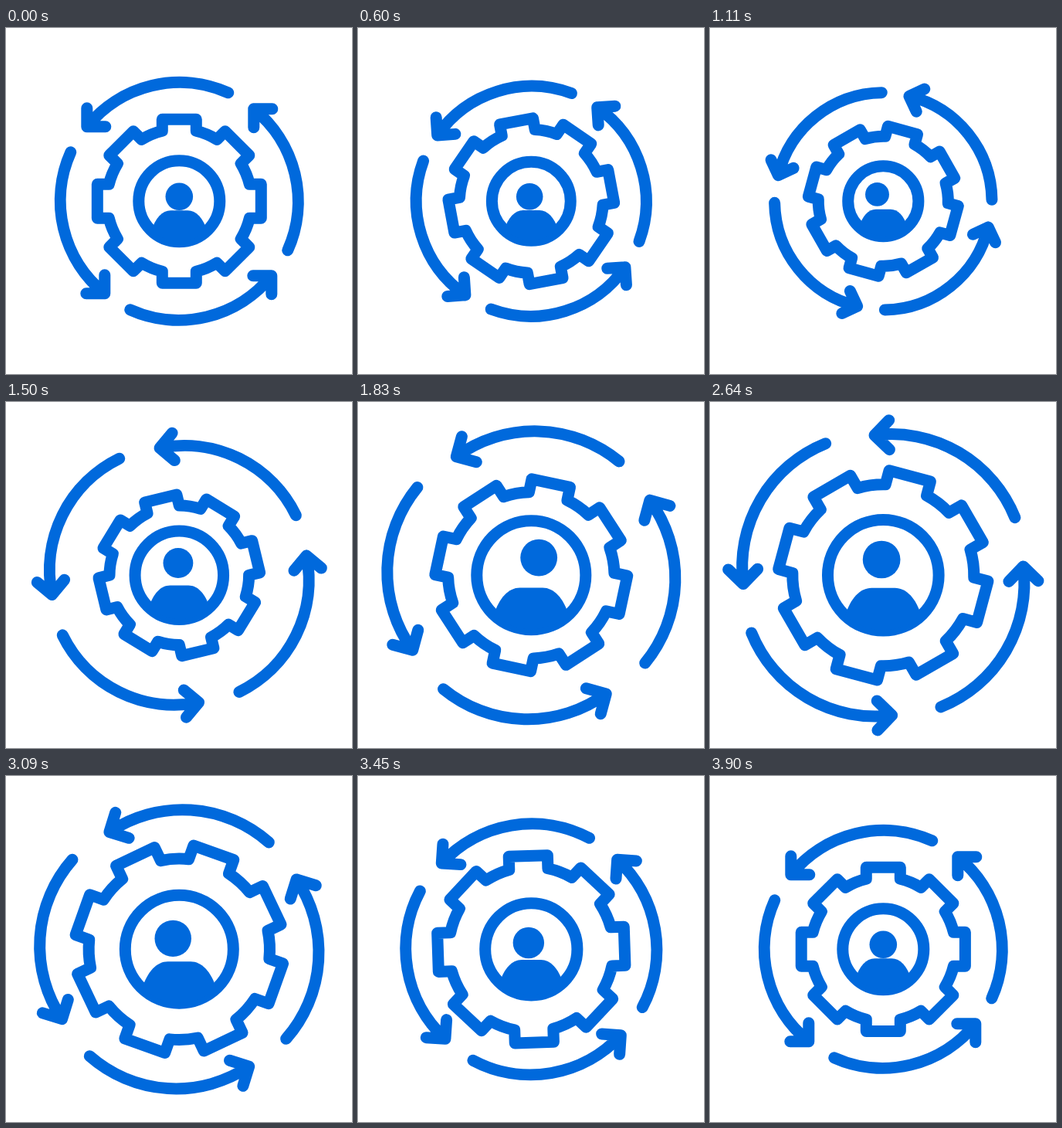
An HTML page for the animation above (4500 ms loop, 448 by 448 pixels).

```html
<!DOCTYPE html>
<html lang="en">
<head>
<meta charset="utf-8">
<title>Team workflow</title>
<style>
  html, body { margin: 0; width: 100%; height: 100%; overflow: hidden; background: #fff; }
  svg { display: block; width: 100vw; height: 100vh; }
  .line { fill: none; stroke: #0069dc; stroke-linecap: round; stroke-linejoin: round; }
  .solid { fill: #0069dc; }
</style>
</head>
<body>
<svg viewBox="0 0 448 448">
  <g transform="translate(224.3 224.3)">
    <g id="arrows" class="line"></g>
    <path id="gear" class="line"/>
    <g id="person">
      <circle id="ring" class="line" r="52.5"/>
      <path class="solid" d="M-36 38C-31 22 -22 12 -11 12H11C22 12 31 22 36 38A53 53 0 0 1 -36 38Z"/>
      <circle id="head" class="solid" r="17.8"/>
    </g>
  </g>
</svg>
<script>
const LOOP = 4500, STEP = 30, STROKE = 15;
// The three beats: wind up, burst out, settle back.
const WIND = 300, BURST = 1050, SETTLE = 2850;
const $ = id => document.getElementById(id);

// Smooth 0 to 1 over a span of time.
function ease(time, start, span) {
  const u = Math.min(1, Math.max(0, (time - start) / span));
  return u * u * (3 - 2 * u);
}

// Scale that dips to low, grows to high and returns to 1; lag delays every beat.
function swell(time, lag, low, high) {
  return 1 - (1 - low) * ease(time, WIND + lag, 750)
    + (high - low) * ease(time, BURST + lag, 750 + lag)
    - (high - 1) * ease(time, SETTLE + lag, 900);
}

function gearPath(teeth, outer, inner) {
  const point = (angle, r, side) => {
    const c = Math.cos(angle), s = Math.sin(angle);
    return `${(r * s + side * c).toFixed(2)} ${(side * s - r * c).toFixed(2)}`;
  };
  const half = 22, root = Math.hypot(inner, half);
  const valley = `A${root} ${root} 0 0 1 `;
  let d = "M";
  for (let i = 0; i < teeth; i++) {
    const a = i * 2 * Math.PI / teeth;
    d += (i ? valley : "") + point(a, inner, -half) + "L" + point(a, outer, -half)
      + "L" + point(a, outer, half) + "L" + point(a, inner, half);
  }
  return d + valley + point(0, inner, -half) + "Z";
}
$("gear").setAttribute("d", gearPath(8, 106, 91));

const arrows = [0, 90, 180, 270].map(angle => {
  const path = document.createElementNS("http://www.w3.org/2000/svg", "path");
  path.setAttribute("d", "M63.5 -140.5A154 154 0 0 0 -119.5 -96.5m0 -24v24h24");
  $("arrows").append(path);
  return { path, angle };
});

// Scales an element while its stroke keeps the same width.
function place(el, transform, scale, stroked = el) {
  el.setAttribute("transform", `${transform} scale(${scale})`);
  stroked.setAttribute("stroke-width", STROKE / scale);
}

function draw(time) {
  const turn = -180 * ease(time, WIND, 3450);
  const push = 14.7 * (ease(time, BURST, 750) - ease(time, SETTLE, 900));
  const size = swell(time, 0, .907, 1.12);
  for (const { path, angle } of arrows)
    place(path, `rotate(${angle + turn}) translate(0 ${-push})`, size);

  const spin = 105 * (ease(time, BURST, 1800) + ease(time, 2070, 1500)) - 30 * ease(time, WIND, 750);
  place($("gear"), `rotate(${spin})`, swell(time, 180, .89, 1.255));

  place($("person"), "", swell(time, 70, .868, 1.368), $("ring"));
  const sway = -9 * ease(time, 360, 750) + 17.3 * ease(time, 1110, 840)
    - 14.4 * ease(time, 1950, 1100) + 6.1 * ease(time, 3050, 800);
  const lift = 11.2 * (ease(time, 480, 1500) - ease(time, 2150, 1650));
  $("head").setAttribute("cx", sway);
  $("head").setAttribute("cy", -6 - lift);
}

const start = performance.now();
function tick(now) {
  const time = Math.max(0, now - start) % LOOP;
  draw(Math.floor(time / STEP) * STEP);
  requestAnimationFrame(tick);
}
draw(0);
requestAnimationFrame(tick);
</script>
</body>
</html>
```
